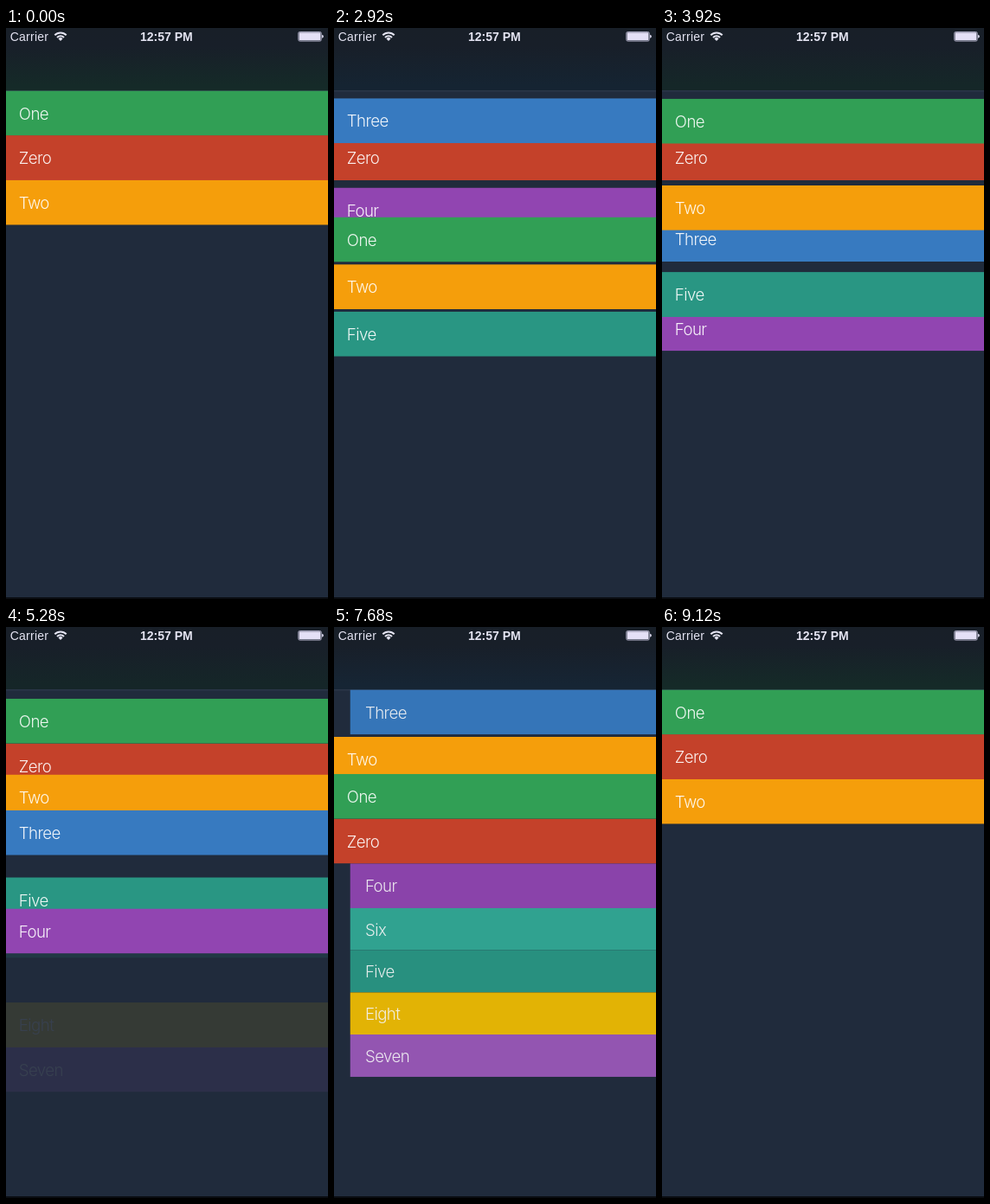
Recreate the animation shown at these times as an HTML page. Size 372 px wide and 660 px high, loop 9.16 s.

```html
<!DOCTYPE html>
<html lang="en">
<head>
<meta charset="utf-8">
<title>Reordering list</title>
<style>
  html, body { margin: 0; width: 100%; height: 100%; overflow: hidden; background: #202b3c; }
  svg { display: block; }
  #stage { width: 100vw; height: 100vh; }
  #rows text { font: 300 18.7px Inter, "Liberation Sans", sans-serif; letter-spacing: -0.6px; fill: #fff; fill-opacity: .92; }
  #status text { font: 14px "Liberation Sans", Arial, sans-serif; fill: #e4e4f2; }
</style>
</head>
<body>
<svg id="stage" viewBox="0 0 372 660" xmlns="http://www.w3.org/2000/svg">
  <defs>
    <linearGradient id="barFill" x2="0" y2="1">
      <stop offset="0" stop-color="#181f28"/>
      <stop offset=".3" stop-color="#181f29"/>
      <stop id="barEnd" offset=".92" stop-color="#172430"/>
    </linearGradient>
  </defs>
  <rect width="372" height="660" fill="#202b3c"/>
  <rect width="372" height="72" fill="url(#barFill)"/>
  <rect y="72" width="372" height="1.5" fill="#2b3648"/>
  <g id="rows"></g>
  <rect y="658" width="372" height="2" fill="#0a0d12"/>
  <g id="status">
    <text x="4.7" y="15" letter-spacing=".25">Carrier</text>
    <text x="185.3" y="15" text-anchor="middle" style="font-weight:700">12:57 PM</text>
    <g fill="none" stroke="#e4e4f2" stroke-width="2">
      <path d="M56.3 8.2a9.4 9.4 0 0 1 13.4 0"/>
      <path d="M59 11a5.6 5.6 0 0 1 8 0"/>
    </g>
    <path d="M63 15l-2.5-2.6a3.5 3.5 0 0 1 5 0z" fill="#e4e4f2"/>
    <rect x="337.8" y="4.5" width="26.4" height="10.6" rx="1.5" fill="none" stroke="#a9a8c0"/>
    <rect x="338.6" y="5.3" width="24.8" height="9" rx=".6" fill="#e4e0f6"/>
    <path d="M365 7.8q2 .6 2 2t-2 2z" fill="#d0cfe2"/>
  </g>
</svg>
<script>
const LOOP = 9160, DURATION = 1515;
const WIDTH = 372, TOP = 72.4, ROW = 51.65, OVERLAP = 0.3;
const COLORS = {
  Zero: [196, 65, 42], One: [49, 159, 85], Two: [245, 158, 11],
  Three: [55, 122, 192], Four: [145, 69, 177], Five: [41, 150, 131],
  Six: [49, 169, 149], Seven: [154, 88, 184], Eight: [238, 187, 2]
};
const BACK = [32, 43, 60], BAR = [17, 26, 34];

const names = text => text.split(" ");
const short = names("One Zero Two");
const mixed = names("Three Zero Four One Two Five");
const sorted = names("One Zero Two Three Five Four");
const full = names("Three Two One Zero Four Six Five Eight Seven");

const moves = [
  { start: 203, from: short, to: mixed },
  { start: 2667, from: mixed, to: sorted },
  { start: 4946, from: sorted, to: full },
  { start: 7427, from: full, to: short }
];

// Where removed rows go: [row, share of height kept].
const EXITS = { Three: [0, 1], Four: [2, 1] };
const exitOf = name => EXITS[name] || [3, 0];

const lerp = (a, b, p) => a + (b - a) * p;
const clamp = v => Math.max(0, Math.min(1, v));
const mix = (a, b, p) => a.map((v, i) => lerp(v, b[i], p));
const rgb = c => `rgb(${c.map(Math.round)})`;

// Cubic bezier (.42, 0, .58, 1), solved by bisection.
function easeInOut(x) {
  let lo = 0, hi = 1, s = x;
  for (let i = 0; i < 24; i++) {
    s = (lo + hi) / 2;
    const at = 1.26 * s * (1 - s) ** 2 + 1.74 * s * s * (1 - s) + s ** 3;
    if (at < x) lo = s; else hi = s;
  }
  return s * s * (3 - 2 * s);
}

function layout({ from, to }, p) {
  const all = [...new Set([...from, ...to])];
  const cells = all.map(name => {
    const i = from.indexOf(name), j = to.indexOf(name);
    const cell = { name, row: j, height: ROW, shift: 0, alpha: 1, depth: -100 };
    if (i < 0) {
      cell.alpha = p;
    } else if (j < 0) {
      const [row, keep] = exitOf(name);
      cell.row = lerp(i, row, p);
      cell.height = ROW * lerp(1, keep, p);
      cell.shift = WIDTH * p;
      cell.alpha = 1 - p;
    } else {
      cell.row = lerp(i, j, p);
      cell.depth = i === j ? -50 : -j;
    }
    return cell;
  });
  return cells.sort((a, b) => a.depth - b.depth);
}

function cellMarkup({ name, row, height, shift, alpha }) {
  if (alpha < 0.002 || height < 0.1) return "";
  const edge = Math.max(0, shift - 2.4);
  return `<svg y="${TOP + row * ROW}" width="${WIDTH}" height="${height + OVERLAP}" opacity="${alpha}">
    <rect x="${edge}" width="${WIDTH}" height="${height + OVERLAP}" fill="${rgb(COLORS[name])}"/>
    <text x="${14.8 + shift}" y="${height / 2 + 7.4}">${name}</text></svg>`;
}

function barColor(cells) {
  let color = mix(BAR, BACK, 0.25);
  for (const { name, row, alpha } of cells) {
    const near = clamp(1 - Math.abs(row) * 1.6) * alpha;
    color = mix(color, mix(BAR, COLORS[name], 0.12), near);
  }
  return rgb(color);
}

const rows = document.getElementById("rows");
const barEnd = document.getElementById("barEnd");

function draw(time) {
  const move = moves.filter(m => m.start <= time).pop() || moves[0];
  const cells = layout(move, easeInOut(clamp((time - move.start) / DURATION)));
  rows.innerHTML = cells.map(cellMarkup).join("");
  barEnd.setAttribute("stop-color", barColor(cells));
}

const begin = performance.now();
function tick() {
  draw((performance.now() - begin) % LOOP);
  requestAnimationFrame(tick);
}
tick();
</script>
</body>
</html>
```
